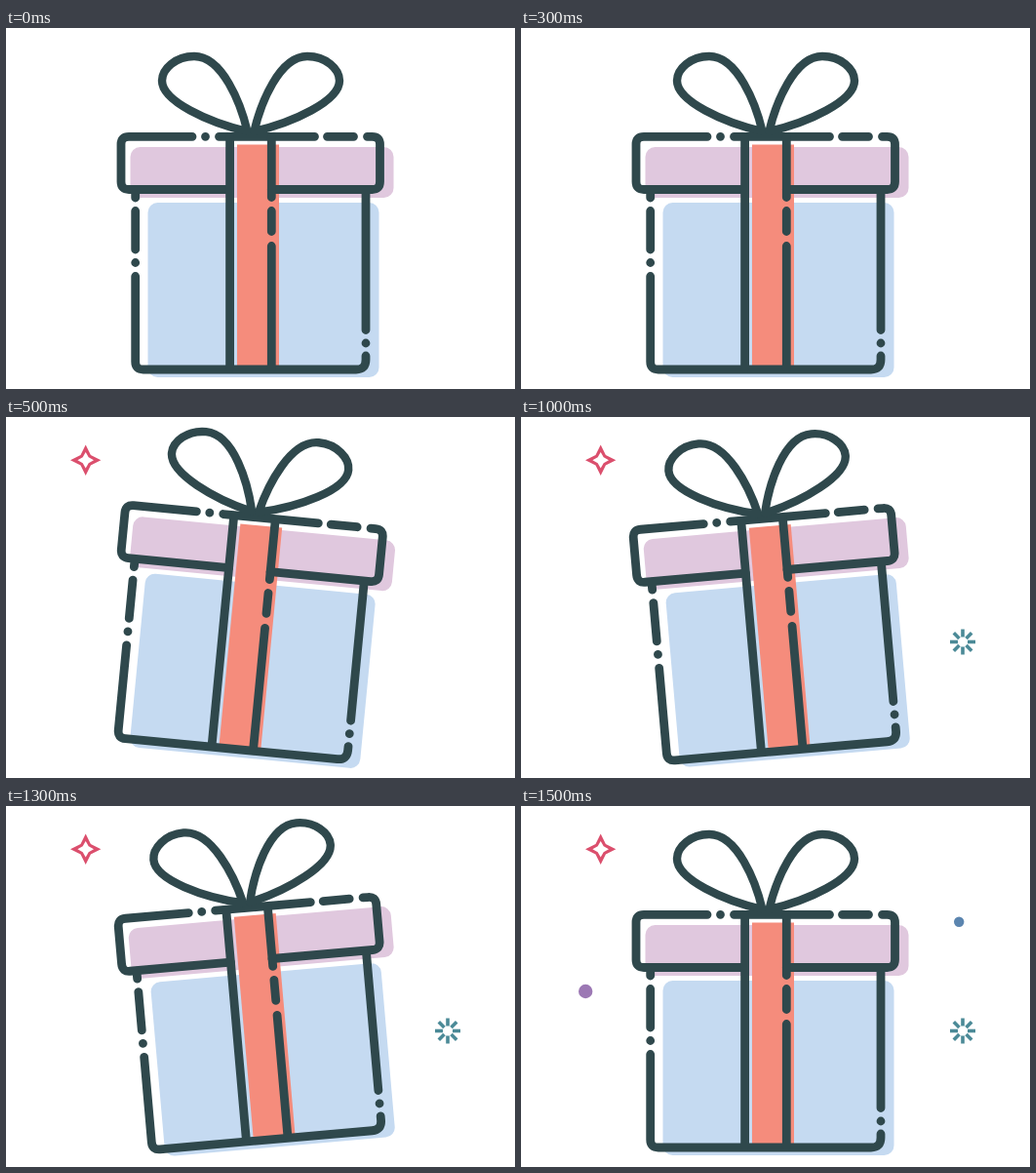
These frames come from a looping animation (522x370 px, 2 s). An HTML page:

```html
<!DOCTYPE html>
<html lang="en">
<head>
<meta charset="utf-8">
<title>Gift box</title>
<style>
  html, body { margin: 0; width: 100%; height: 100%; overflow: hidden; background: #fff; }
  svg { display: block; width: 100vw; height: 100vh; }
  .ink { fill: none; stroke: #2f484c; stroke-width: 8.8; stroke-linecap: round; stroke-linejoin: round; }
</style>
</head>
<body>
<svg viewBox="0 0 522 370">
  <defs>
    <path id="loop" d="M247.5 106C241 78 222 29 193 29C174 29 160 42 160 54C160 75 208 97 247.5 106Z"/>
    <path id="spoke" d="M0 -5V-13" stroke="#4b8a97" stroke-width="3.6"/>
  </defs>

  <g id="gift">
    <rect x="145.5" y="179" width="237" height="179" rx="10" fill="#c5daf1"/>
    <rect x="127.5" y="122" width="270" height="52" rx="10" fill="#e0c8de"/>
    <rect x="237" y="119.5" width="43" height="229" fill="#f58c7c"/>

    <g class="ink">
      <!-- body -->
      <path d="M132.7 166V174M132.7 187.5V227M132.7 240.5v.01M132.7 254.5V342Q132.7 350 140.7 350H359Q369 350 369 340V336M369 323v.01M369 309.5V166"/>
      <!-- lid -->
      <path d="M191 111.3H126Q118 111.3 118 119.3V157.5Q118 165.5 126 165.5H229.5M272.3 165.5H375.5Q383.5 165.5 383.5 157.5V119.3Q383.5 111.3 375.5 111.3H370.5M204.5 111.3h.01M218.5 111.3H316.5M329.5 111.3H356.5"/>
      <!-- ribbon -->
      <path d="M229.6 112V349M272.3 112V173.5M272.3 187.5V208.5M272.3 223.5V349"/>
      <!-- bow -->
      <g stroke-width="8.4">
        <use href="#loop"/>
        <use href="#loop" transform="translate(502 0) scale(-1 1)"/>
      </g>
    </g>
  </g>

  <path id="star" transform="translate(81.7 44.2)" fill="#db4f6d" fill-rule="evenodd"
    d="M0 -15.7L5.2 -5.2L15.7 0L5.2 5.2L0 15.7L-5.2 5.2L-15.7 0L-5.2 -5.2ZM0 -8.3L3 -3L8.3 0L3 3L0 8.3L-3 3L-8.3 0L-3 -3Z"/>
  <g id="burst" transform="translate(453 230.5)"></g>
  <g id="dots">
    <circle cx="449.2" cy="118.7" r="5.2" fill="#5b85af"/>
    <circle cx="66.2" cy="190" r="7.2" fill="#9c78b4"/>
  </g>
</svg>
<script>
  const LOOP = 2000, STEP = 500;
  const PIVOT = [235.3, 224.8];
  // shift x, shift y, tilt in degrees
  const poses = [[0, 0, 0], [-6.7, -10.7, 5.5], [6, -6, -5], [0, 0, 0]];
  // step at which each sparkle pops in
  const sparkles = { star: 1, burst: 2, dots: 3 };
  const el = id => document.getElementById(id);

  for (let i = 0; i < 8; i++) {
    const ray = document.createElementNS("http://www.w3.org/2000/svg", "use");
    ray.setAttribute("href", "#spoke");
    ray.setAttribute("transform", `rotate(${i * 45})`);
    el("burst").append(ray);
  }

  function draw(time) {
    const step = Math.floor((time % LOOP) / STEP);
    const [x, y, tilt] = poses[step];
    el("gift").setAttribute("transform", `translate(${x} ${y}) rotate(${tilt} ${PIVOT})`);
    for (const id in sparkles) {
      el(id).setAttribute("visibility", step >= sparkles[id] ? "visible" : "hidden");
    }
  }

  const start = performance.now();
  function tick() {
    draw(performance.now() - start);
    requestAnimationFrame(tick);
  }
  tick();
</script>
</body>
</html>
```
